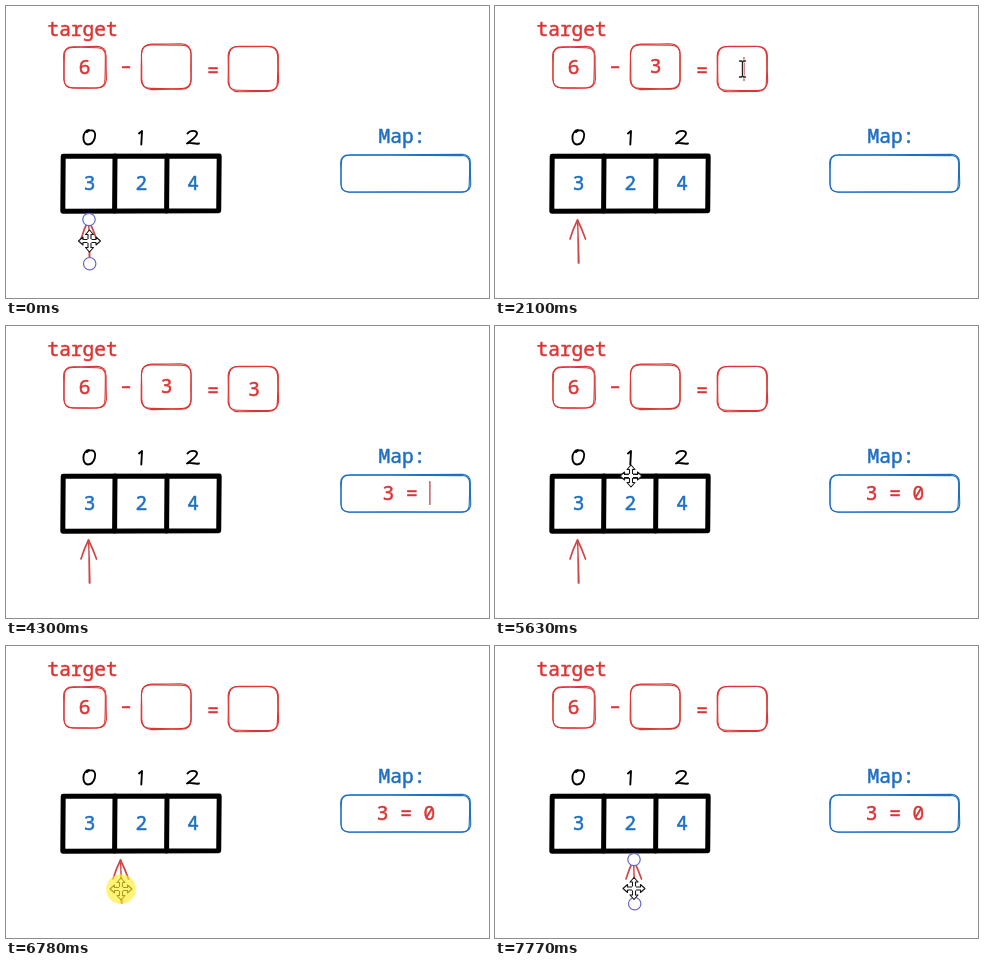
An HTML page with a canvas that plays this animation: 483 px wide and 292 px high, repeating every 8000 ms.

```html
<!DOCTYPE html>
<html lang="en">
<head>
<meta charset="utf-8">
<title>Two sum sketch</title>
<style>
  html, body { margin: 0; width: 100%; height: 100%; overflow: hidden; background: #fff; }
  canvas { display: block; width: 483px; height: 292px; }
</style>
</head>
<body>
<canvas id="stage"></canvas>
<script>
const W = 483, H = 292, LOOP = 8000, STEP = 68;
const RED = '#dc3535', BLUE = '#1f6fc2', INK = '#000', GLOW = 'rgba(255, 238, 40, 0.64)';
const MONO = '19.5px "Noto Sans Mono", "DejaVu Sans Mono", monospace';
const CHAR = 11.7;

const canvas = document.getElementById('stage');
const dpr = window.devicePixelRatio || 1;
canvas.width = W * dpr;
canvas.height = H * dpr;
const ctx = canvas.getContext('2d');
ctx.scale(dpr, dpr);
ctx.lineCap = ctx.lineJoin = 'round';

// [time, cursor, x, y, glides to the next key]
const pointer = [
  [0, 'move', 83.5, 235],
  [790, 'move', 83.5, 234, true],
  [930, 'move', 86, 222],
  [1200, 'hand', 93, 190, true],
  [1410, 'text', 152, 58],
  [1550, 'none', 152, 58],
  [2100, 'text', 247.5, 63],
  [2500, 'arrow', 262, 74, true],
  [2780, 'arrow', 400, 173],
  [2850, 'text', 407, 162],
  [3250, 'text', 409, 163],
  [3580, 'text', 405, 152, true],
  [3710, 'text', 414, 168],
  [4040, 'none', 414, 168],
  [5560, 'arrow', 160, 76],
  [5630, 'move', 136, 150, true],
  [5900, 'move', 88, 228, true],
  [6240, 'move', 82, 242],
  [6510, 'move', 85, 243, true],
  [6780, 'move', 115, 243, true],
  [7270, 'move', 128, 245, true],
  [7600, 'move', 139, 242.5]
];
const glows = [[200, 590], [1410, 1550], [2850, 3250], [6310, 7700]];
const carets = [[1550, 2100, 160, 61], [2100, 2500, 249, 63]];
const mapText = [[4040, '3'], [4170, '3 ='], [4300, '3 = '], [5030, '3 = 0']];

const within = (t, a, b) => t >= a && t < b;
const lastKey = (keys, t) => keys.reduce((n, k, i) => (t >= k[0] ? i : n), -1);

function pointerAt(t) {
  const i = lastKey(pointer, t);
  const [t0, kind, x, y, glide] = pointer[i];
  if (!glide) return { kind, x, y };
  const [t1, , x1, y1] = pointer[i + 1];
  const p = Math.floor((t - t0) / STEP) * STEP / (t1 - t0);
  return { kind, x: x + (x1 - x) * p, y: y + (y1 - y) * p };
}

function stroke(path, color, width) {
  ctx.strokeStyle = color;
  ctx.lineWidth = width;
  ctx.stroke(new Path2D(path));
}

// A thin outline gives the letters a medium weight
function text(s, x, y, color, align = 'center') {
  ctx.font = MONO;
  ctx.textAlign = align;
  ctx.fillStyle = ctx.strokeStyle = color;
  ctx.lineWidth = 0.5;
  ctx.fillText(s, x, y);
  ctx.strokeText(s, x, y);
}

// Rounded box outlined twice with a small wobble
function sketchBox(l, t, r, b, rad, color, seed) {
  for (let k = 0; k < 2; k++) {
    const j = n => Math.sin(seed * 7.3 + n * 2.1 + k * 3) * 0.4;
    const x0 = l + j(1), x1 = r + j(2), y0 = t + j(3), y1 = b + j(4);
    const mx = (l + r) / 2, my = (t + b) / 2;
    stroke(`M${x0 + rad} ${y0}Q${mx} ${y0 + j(5)} ${x1 - rad} ${y0 + j(6)}` +
      `Q${x1} ${y0} ${x1} ${y0 + rad}Q${x1 + j(7)} ${my} ${x1 + j(8)} ${y1 - rad}` +
      `Q${x1} ${y1} ${x1 - rad} ${y1}Q${mx} ${y1 + j(9)} ${x0 + rad} ${y1 + j(10)}` +
      `Q${x0} ${y1} ${x0} ${y1 - rad}Q${x0 + j(11)} ${my} ${x0 + j(12)} ${y0 + rad}` +
      `Q${x0} ${y0} ${x0 + rad} ${y0}`, color, 1.1);
  }
}

function drawBoard() {
  text('target', 41.5, 30, RED, 'left');
  sketchBox(58, 41, 99.7, 82, 9, RED, 1);
  sketchBox(135.5, 38.5, 185, 83, 10, RED, 2);
  sketchBox(222.5, 40.5, 272, 85, 10, RED, 3);
  text('6', 78.5, 68, RED);
  text('–', 120, 67, RED);
  text('=', 207, 70.5, RED);

  stroke('M83 124C76 124.500 75.500 138.500 82 138.500C89 138.500 91.500 126 86.500 124.500C84 124 82 125 81 126', INK, 1.9);
  stroke('M133 127.500L136 125L135.300 138.500', INK, 1.9);
  stroke('M181.500 127.500C184 124 191 124 191 127.500C191 131 184 135 181 137.500C184 135.500 188 138.500 193 137.500', INK, 1.9);

  stroke('M57.200 150.200L213.200 150L212.700 204.800L56.800 205.300Z', INK, 5);
  stroke('M109 150L108.600 205M161 150L160.600 205', INK, 5);
  ['3', '2', '4'].forEach((d, i) => text(d, 83.7 + i * 51.7, 184, BLUE));

  text('Map:', 396, 137, BLUE);
  sketchBox(335, 149, 464, 186, 8, BLUE, 4);
}

function drawCaret(x, y) {
  stroke(`M${x} ${y - 11.5}V${y + 11.5}`, '#b23a3a', 1.2);
}

function drawMap(t) {
  const i = lastKey(mapText, t);
  const s = i < 0 ? '' : mapText[i][1];
  const half = s.length * CHAR / 2;
  text(s, 400 - half, 174, RED, 'left');
  if (within(t, 3250, 4830) || within(t, 5030, 5560)) drawCaret(400.5 + half, 167);
}

function drawArrow(dx, selected) {
  ctx.save();
  ctx.translate(dx, 0);
  stroke('M84 257Q83.500 236 82.500 214M83.300 257L82.800 215', '#cf4848', 1.4);
  stroke('M82.500 214Q78 223 75 233M82.500 214Q87 223 90.500 233', '#cf4848', 1.7);
  if (selected) {
    for (const [x, y] of [[83, 213.5], [83.7, 257.7]]) {
      ctx.beginPath();
      ctx.arc(x, y, 6.2, 0, 7);
      ctx.fillStyle = '#fff';
      ctx.fill();
      ctx.strokeStyle = '#6268c8';
      ctx.lineWidth = 1.2;
      ctx.stroke();
    }
  }
  ctx.restore();
}

function shape(path) {
  const p = typeof path === 'string' ? new Path2D(path) : path;
  ctx.fillStyle = '#fff';
  ctx.fill(p);
  ctx.strokeStyle = '#151515';
  ctx.lineWidth = 1.1;
  ctx.stroke(p);
}

const cursors = {
  none() {},
  move() {
    const arm = new Path2D('M-1.500 -1.500V-6.500H-4L0 -11L4 -6.500H1.500V-1.500');
    const cross = new Path2D();
    for (let i = 0; i < 4; i++) cross.addPath(arm, new DOMMatrix().rotate(i * 90));
    shape(cross);
    ctx.fillRect(-2, -2, 4, 4);
  },
  hand() {
    shape('M-1.500 1Q0 -1.500 1.500 1V8L2 6.500Q4 5.500 4.800 7.500Q7 6.500 7.800 8.500' +
      'Q10.500 8 10.500 11V15Q10.500 18 8.500 19.500V22H0.500V20' +
      'L-6 13Q-6.500 10.500 -4 11L-1.500 13.500Z');
    stroke('M2 8V11M4.800 8V11M7.800 9V11.500', '#151515', 0.9);
  },
  arrow() {
    shape('M0 0V16L3.700 12.500L6.200 18L8.700 16.900L6.300 11.500H11.300Z');
  },
  text() {
    const bar = 'M-3 -8H-1L0 -7L1 -8H3M0 -7V7M-3 8H-1L0 7L1 8H3';
    stroke(bar, '#fff', 3);
    stroke(bar, '#222', 1.4);
  }
};

function drawPointer(t) {
  const { kind, x, y } = pointerAt(t);
  ctx.save();
  ctx.translate(x, y);
  cursors[kind]();
  if (glows.some(([a, b]) => within(t, a, b))) {
    ctx.beginPath();
    ctx.arc(0, 0, 14.8, 0, 7);
    ctx.fillStyle = GLOW;
    ctx.fill();
  }
  ctx.restore();
}

function draw(t) {
  ctx.fillStyle = '#fff';
  ctx.fillRect(0, 0, W, H);
  drawBoard();
  if (within(t, 2100, 5630)) text('3', 160.5, 67, RED);
  if (within(t, 2500, 5560)) text('3', 248, 70, RED);
  drawMap(t);
  for (const [a, b, x, y] of carets) if (within(t, a, b)) drawCaret(x, y);
  const shift = t < 6510 ? 0 : pointerAt(t).x - 83;
  drawArrow(shift, t < 1410 || t >= 7700);
  drawPointer(t);
}

function tick() {
  draw(performance.now() % LOOP);
  requestAnimationFrame(tick);
}
tick();
</script>
</body>
</html>
```
